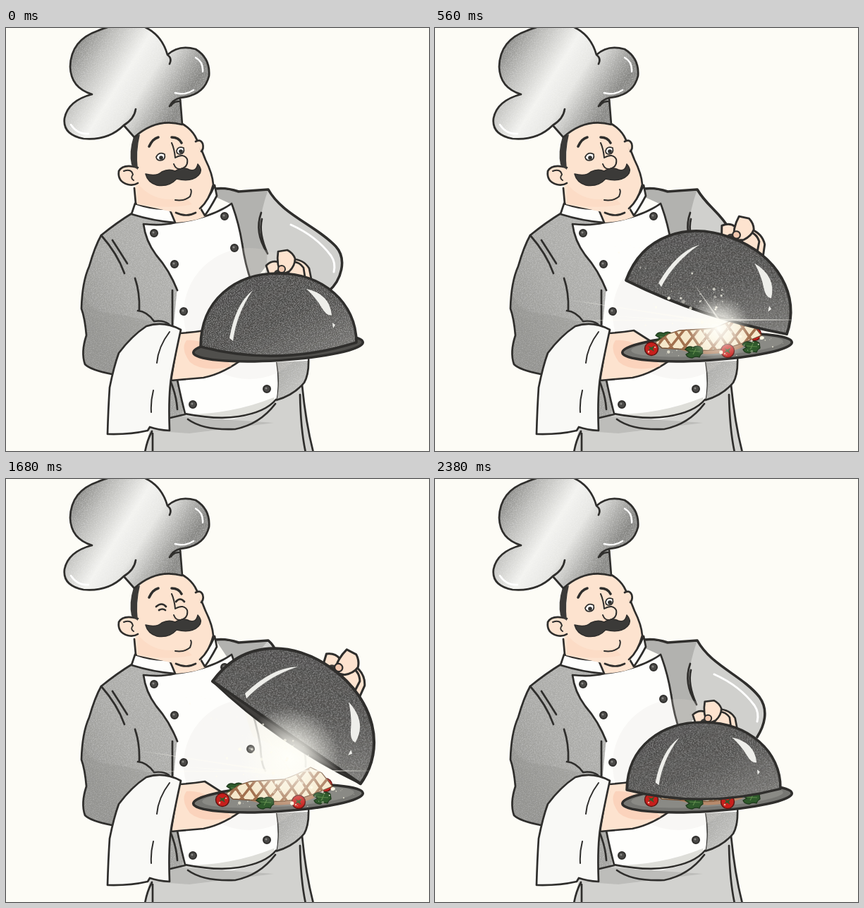
Recreate the animation shown at these times as an HTML page. Size 600 px wide and 600 px high, loop 2520 ms.

```html
<!DOCTYPE html>
<html lang="en">
<head>
<meta charset="utf-8">
<title>Chef lifting a cloche</title>
<style>
html, body { margin: 0; width: 100%; height: 100%; overflow: hidden; background: #fdfcf6; }
svg { display: block; width: 100vw; height: 100vh; }
.ink { fill: none; stroke: #2f2e2c; stroke-width: 2.7; stroke-linecap: round; stroke-linejoin: round; }
.thin { stroke-width: 2; }
.bold { stroke-width: 3.6; }
.skin { fill: #fde3cf; }
.white { fill: #fefefc; }
.towel { fill: #f9f9f6; }
.dark { fill: #3b3a38; }
</style>
</head>
<body>
<svg viewBox="0 0 600 600">
<defs>
  <linearGradient id="hat" gradientUnits="userSpaceOnUse" x1="85" y1="30" x2="275" y2="150">
    <stop offset="0" stop-color="#7f7f7c"/><stop offset=".2" stop-color="#bfbfbc"/>
    <stop offset=".4" stop-color="#f3f3f0"/><stop offset=".54" stop-color="#e6e6e3"/>
    <stop offset=".8" stop-color="#868683"/><stop offset="1" stop-color="#a5a5a2"/>
  </linearGradient>
  <linearGradient id="coat" gradientUnits="userSpaceOnUse" x1="115" y1="420" x2="235" y2="350">
    <stop offset="0" stop-color="#989895"/><stop offset=".5" stop-color="#a9a9a6"/>
    <stop offset="1" stop-color="#b0b0ad"/>
  </linearGradient>
  <linearGradient id="side" x1="0" x2="1" y1="0" y2="1">
    <stop offset="0" stop-color="#a5a5a2"/><stop offset="1" stop-color="#cbcbc8"/>
  </linearGradient>
  <linearGradient id="steel" x1="0" y1="0" x2="1" y2="1">
    <stop offset="0" stop-color="#474644"/><stop offset=".55" stop-color="#504f4d"/>
    <stop offset="1" stop-color="#7b7a77"/>
  </linearGradient>
  <radialGradient id="light">
    <stop offset="0" stop-color="#fffffa"/><stop offset=".35" stop-color="#fffef6" stop-opacity=".75"/>
    <stop offset="1" stop-color="#fffef6" stop-opacity="0"/>
  </radialGradient>
  <filter id="grain" x="0" y="0" width="1" height="1">
    <feTurbulence type="fractalNoise" baseFrequency=".7" numOctaves="2" seed="4"/>
    <feColorMatrix values="0 0 0 0 1  0 0 0 0 1  0 0 0 0 1  .6 0 0 0 -.26"/>
    <feComposite in2="SourceGraphic" operator="in" result="dots"/>
    <feMerge><feMergeNode in="SourceGraphic"/><feMergeNode in="dots"/></feMerge>
  </filter>
  <path id="fish" d="M313 446L331 434L347 429L394 426Q412 420 432 409L448 417L463 436L436 447Q404 459 378 457L322 454Z"/>
  <clipPath id="fishClip"><use href="#fish"/></clipPath>
  <g id="leaf">
    <path d="M-13-3Q-9-9-2-6Q5-10 11-5L12 2Q8 4 7 8Q1 6-3 9Q-10 9-12 4L-7 1Z" fill="#2f5a2c" stroke="#1f3a1d" stroke-width="1.3"/>
    <path d="M-7-1L8 0M-2 4L2-4" stroke="#5f8a4c" stroke-width="1.2"/>
  </g>
  <g id="tomato">
    <circle r="9.5" fill="#c81f1c" stroke="#5c1512" stroke-width="1.4"/>
    <path d="M-5-4L0-2L5-5L2 0L4 4L-1 1L-5 3L-2-1Z" fill="#335a2b"/>
    <circle cx="-4" cy="4" r="1.3" fill="#f4a795"/>
  </g>
</defs>

<!-- trousers and apron -->
<path d="M207 550L198 602H436Q428 555 420 505L380 470H230Z" fill="#d2d2cf"/>
<path d="M204 571H232V550L380 560L260 575Z" fill="#bdbdba"/>
<path class="ink" d="M207 572Q200 585 197 602M208 575V602M420 506Q425 560 436 602M417 520Q418 570 425 602"/>

<!-- torso and left sleeve -->
<path d="M180 262L240 274L260 480L250 550L232 553L233 492L150 491Q120 485 112 477Q106 460 114 436Q112 412 107 398Q108 360 118 338Q126 310 135 294Q157 276 180 262Z" fill="url(#coat)" filter="url(#grain)"/>
<path d="M108 375Q116 405 160 406L220 420L160 462L150 490L114 478Q108 460 114 436Z" fill="#868683" opacity=".25"/>
<path class="ink" d="M180 262Q157 276 135 294Q126 310 118 338Q108 360 107 398Q112 412 114 436Q106 460 112 477Q120 485 150 491"/>
<path class="ink" d="M135 294Q158 320 168 348M151 301Q162 318 172 334M183 355Q190 375 189 401M187 401Q200 402 210 416Q223 414 231 420"/>

<!-- right shoulder and sleeve -->
<path id="shoulder" fill="#b2b2af"/>
<path id="sleeve" fill="#d0d0cd"/>
<path id="sleeveEdge" class="ink bold"/>
<path id="crease" class="ink" d="M362 262Q352 290 370 318M363 271Q358 291 371 320"/>
<path id="sheen" fill="none" stroke="#fff" stroke-width="3" stroke-linecap="round" d="M404 279Q440 295 461 323Q468 333 465 346"/>

<!-- front panel -->
<path d="M385 470H429Q430 491 423 503Q408 521 383 528Z" fill="url(#side)" filter="url(#grain)"/>
<path class="ink" d="M429 468Q430 491 423 503Q408 521 383 528M383 474Q388 500 383 528"/>
<path class="white" d="M195 278Q220 281 240 276Q290 270 320 249Q330 275 334 305Q338 335 350 365L428 400V472L383 474Q388 505 383 530Q360 549 320 555Q280 556 254 547Q247 520 242 494L237 430L243 368Q224 340 213 322Q198 302 195 278Z"/>
<path d="M255 548Q320 548 380 524L382 532Q350 555 290 553Z" fill="#deded9"/>
<path class="ink" d="M243 372Q232 344 213 322Q198 302 195 278Q220 281 240 276Q290 270 320 249Q330 275 335 306M236 372V431M242 494Q247 520 254 547Q300 556 330 551Q368 545 383 527M233 553L254 548M258 555Q280 571 325 569Q360 562 382 533M233 500Q242 522 243 541"/>
<path id="flap" class="ink"/>
<circle cx="345" cy="405" r="93" fill="#deddd7" opacity=".2"/>
<g id="buttons" class="ink thin"></g>

<!-- neck and head -->
<path class="skin" d="M182 225L183 250L232 261L241 276Q270 274 283 267L296 225Z"/>
<path class="ink" style="fill:#fefefc" d="M183 249L178 264Q210 274 240 276L232 257Q205 257 183 249Z"/>
<path class="ink" style="fill:#fefefc" d="M296 223L299 238Q290 255 282 266L275 254Q288 243 296 223Z"/>
<path class="skin" d="M188 153Q215 122 255 137Q270 155 283 187Q293 207 294 222Q288 245 274 260Q261 269 242 262L186 250Q182 235 184 222Z"/>
<path d="M188 222Q213 251 254 240L264 250Q230 258 187 249ZM226 180Q238 204 252 199L244 210Z" fill="#f9cfb7" opacity=".4"/>
<path class="ink" d="M250 136Q261 142 268 153Q274 164 283 187Q293 207 294 222Q288 245 275 256M182 227L184 249M241 262Q256 269 269 262"/>
<path class="ink" style="fill:#fde3cf" d="M187 198Q166 192 160 203Q158 218 173 222Q181 224 187 220"/>
<path class="ink thin" d="M167 203Q178 199 180 208Q176 213 181 216"/>
<path class="ink" style="fill:#fde3cf" d="M269 161Q276 157 279 164Q281 171 277 175"/>
<path class="dark" d="M181 154L190 151Q184 175 187 201L178 194Q174 176 181 154Z"/>
<path class="ink bold" d="M203 168Q208 157 216 155M235 155Q245 155 249 163"/>
<g id="open" class="ink" style="stroke-width:1.7">
  <path style="fill:#fff" d="M213 183Q217 175 225 179Q227 187 219 188Q214 188 213 183ZM242 174Q244 167 252 170Q254 178 247 179Q242 179 242 174Z"/>
  <circle cx="220" cy="184" r="2" fill="#333"/><circle cx="248" cy="175" r="2" fill="#333"/>
</g>
<path id="shut" class="ink" d="M213 181Q221 174 227 181M217 186Q222 183 226 186M241 174Q247 167 253 174"/>
<path class="ink thin" style="fill:#fde3cf" d="M235 163Q239 172 240 184Q252 177 257 186Q259 197 248 200Q241 201 238 193"/>
<path class="dark" stroke="#2f2e2c" stroke-width="1.5" stroke-linejoin="round" d="M198 207Q214 211 221 204Q231 199 240 203Q251 196 260 201Q270 204 272 193Q280 202 273 209Q263 219 242 214Q231 226 214 223Q201 219 198 207Z"/>
<path class="ink thin" d="M240 244Q253 246 261 239Q264 232 262 229"/>

<!-- hat -->
<path d="M182 155L167 138Q145 160 110 157Q80 151 83 128Q88 103 122 94Q92 85 91 55Q92 17 130 4Q157-8 190-4Q220 6 229 38Q245 23 269 30Q290 43 288 68Q281 96 247 99L250 137Q213 127 182 155Z" fill="url(#hat)" filter="url(#grain)"/>
<path class="ink" d="M182 155L167 138Q145 160 110 157Q80 151 83 128Q88 103 122 94Q92 85 91 55Q92 17 130 4Q157-8 190-4Q220 6 229 38Q245 23 269 30Q290 43 288 68Q281 96 247 99L250 137Q213 127 182 155ZM122 94L116 92M184 115Q182 129 167 138M229 38Q236 43 232 51M247 99Q236 102 232 111M246 104Q238 104 234 110"/>
<path d="M269 42Q280 48 279 62M92 137Q101 151 117 150M240 92Q254 96 266 88" fill="none" stroke="#fff" stroke-width="2.5" stroke-linecap="round"/>

<!-- towel and forearm -->
<path class="ink" style="fill:#fde3cf" d="M245 433Q264 432 282 429L340 466Q310 490 280 496L234 500Z"/>
<path d="M256 443Q282 440 310 468L320 480Q279 489 261 474Q247 455 256 443Z" fill="#f9c4a9" opacity=".5"/>
<path class="towel" d="M248 428Q242 455 235 491Q230 520 232 571Q215 570 204 566L201 571Q175 577 144 576Q145 540 147 510Q153 480 160 461Q178 437 199 423Q224 415 248 428Z"/>
<path class="ink" d="M248 428Q242 455 235 491Q230 520 232 571Q215 570 204 566L201 571Q175 577 144 576Q145 540 147 510Q153 480 160 461Q178 437 199 423Q224 415 248 428Z"/>
<path class="ink thin" d="M232 431Q216 452 214 475M209 514Q205 530 206 545"/>

<!-- plate and food -->
<ellipse id="plate" cx="386" cy="453" rx="120.5" ry="18.5" transform="rotate(-3.5 386 453)" class="ink bold"/>
<g id="food">
  <ellipse cx="386" cy="451" rx="108" ry="14" transform="rotate(-3.5 386 451)" fill="#a6a6a0" opacity=".4"/>
  <use href="#leaf" x="326" y="439"/>
  <use href="#tomato" x="453" y="434"/>
  <path d="M330 452Q372 440 445 441L436 453Q405 466 365 461Z" fill="#b78a6c"/>
  <use href="#fish" fill="#f5e8cb" stroke="#6e4a2f" stroke-width="1.3"/>
  <path id="grill" clip-path="url(#fishClip)" fill="none" stroke="#a2714f" stroke-width="3.6"/>
  <use href="#leaf" x="368" y="459"/><use href="#leaf" x="449" y="452"/>
  <use href="#tomato" x="307" y="455"/><use href="#tomato" x="415" y="458"/>
</g>
<g id="plateSparks" fill="#fffbe6"></g>

<!-- cloche with the hand on its knob -->
<g id="lid">
  <g class="ink" style="fill:#fde3cf">
    <path d="M406 328Q422 328 430 341L433 356L404 356Z"/>
    <path d="M402 333Q414 329 422 340L424 353L400 356Z"/>
    <path d="M369 337Q377 329 386 332L393 348L374 352Z"/>
    <path d="M386 317L399 315Q407 319 410 327Q410 337 402 345L391 350Q383 336 386 317Z"/>
  </g>
  <path class="dark" d="M380 350Q379 343 388 342Q397 343 396 350Z"/>
  <circle class="ink thin" style="fill:#f3c9b0" cx="391" cy="342" r="5"/>
  <path id="dome" fill="url(#steel)" filter="url(#grain)"/>
  <path id="domeEdge" class="ink bold"/>
  <path id="inside" class="ink" style="fill:#413f3d"/>
  <path d="M350 372Q325 392 317 440L322 444Q327 405 350 372ZM426 370Q459 377 462 407Q455 409 448 397Q440 383 426 370ZM463 418L467 421L464 426Z" fill="#eeeeea"/>
</g>

<!-- light -->
<g id="glow">
  <circle id="halo" cx="402" fill="url(#light)"/>
  <path d="M404 420L186 385L404 417ZM404 421L235 407L404 418ZM190 415L404 412.5L525 414L404 415.5ZM404 418L365 360L406 416Z" fill="#fffef6" opacity=".6"/>
</g>
<g id="airSparks" fill="#fffdf0"></g>
</svg>
<script>
const $ = id => document.getElementById(id);
const set = (id, name, value) => $(id).setAttribute(name, value);
const show = (id, on) => $(id).style.display = on ? '' : 'none';

let seed = 7;
const rnd = () => (seed = seed * 16807 % 2147483647) / 2147483647;
const dot = (x, y, r, o) =>
  `<circle cx="${x.toFixed(1)}" cy="${y.toFixed(1)}" r="${r.toFixed(1)}" opacity="${o.toFixed(2)}"/>`;
const dots = (n, place) => Array.from({ length: n }, () =>
  dot(...place(), .5 + rnd() ** 4 * 2.2, .35 + rnd() * .6)).join('');

const buttons = [[210, 291], [310, 267], [239, 335], [252, 402], [265, 534], [370, 512], [324, 312], [347, 383]];
$('buttons').innerHTML = buttons.map(([x, y]) =>
  `<g><circle cx="${x}" cy="${y}" r="5" fill="#4b4a48"/><circle cx="${x - 1}" cy="${y - 1}" r="1.5" fill="#8a8986" stroke="none"/></g>`).join('');

let bars = '';
for (let x = 280; x < 490; x += 20) bars += `M${x} 400L${x + 44} 465M${x + 36} 400L${x - 16} 465`;
set('grill', 'd', bars);

$('plateSparks').innerHTML = dots(60, () => {
  const a = rnd() * 6.283, r = Math.sqrt(rnd());
  return [386 + 112 * r * Math.cos(a), 453 + 15 * r * Math.sin(a) - 6 * r * Math.cos(a)];
});
$('airSparks').innerHTML = dots(70, () => {
  const u = rnd();
  return [255 + u * 175, 290 + u * 90 + rnd() * (150 - u * 90)];
});

// Each pose: rim left x, y, rim right x, y, front bulge, back bulge, halo radius, light strength
const poses = [
  [276, 452, 497, 446, 16, 16, 0, 0],
  [272, 441, 490, 439, 15, 15, 0, 0],
  [267, 420, 484, 442, 11, 11, 0, 0],
  [267, 389, 487, 436, 10, 10, 0, 0],
  [271, 358, 499, 434, 8, 8, 46, 1],
  [280, 322, 501, 433, 5, 5, 62, 1],
  [293, 287, 503, 432, 9, 0, 72, 1],
  [305, 257, 507, 431, 11, -17, 42, .6]
];
const sleeves = [
  'C392 265 440 280 468 310C484 328 476 358 457 374',
  'C392 265 435 278 460 309C474 328 467 350 457 366',
  'C392 265 435 278 460 309C474 328 467 350 457 366',
  'C388 262 430 278 453 309C470 328 467 343 465 356',
  'C385 252 405 262 418 286L400 330',
  'C382 242 390 252 398 268L390 310',
  'Q380 236 383 245L370 265',
  'L365 240'
];

// Carries the resting rim onto the given rim; flat squeezes the height of the dome
function lidMatrix(x1, y1, x2, y2, flat) {
  const dx = 221, dy = -6, d = dx * dx + dy * dy, ex = x2 - x1, ey = y2 - y1;
  const a = (ex * dx + ey * dy) / d, b = (ey * dx - ex * dy) / d, c = -b * flat, e = a * flat;
  return `matrix(${a} ${b} ${c} ${e} ${x1 - a * 276 - c * 452} ${y1 - b * 276 - e * 452})`;
}

function draw(p) {
  const [x1, y1, x2, y2, front, back, halo, power] = poses[p];
  const happy = p > 5;
  const arc = 'M276 452C276 386 325 348 386 348C450 348 497 390 497 446';
  const rim = b => `Q386 ${449 + 2 * b} `;
  const dome = `${arc}${rim(back)}276 452Z`;
  set('lid', 'transform', lidMatrix(x1, y1, x2, y2, p ? .955 : 1));
  set('dome', 'd', dome);
  set('domeEdge', 'd', dome);
  set('inside', 'd', `M276 452${rim(back)}497 446${rim(front)}276 452Z`);
  show('inside', happy);

  const top = 'M297 228Q312 226 330 232L372 229';
  set('shoulder', 'd', happy ? 'M297 228L330 232L372 229L381 244L320 262Z'
    : 'M297 228L330 232L372 229L375 330L350 362Q334 320 320 250L298 240Z');
  set('sleeve', 'd', 'M372 229' + sleeves[p] + (happy ? 'L350 255Z' : 'L362 365Q372 340 370 318Q350 290 372 229Z'));
  set('sleeveEdge', 'd', top + sleeves[p]);
  show('crease', p < 5);
  show('sheen', p < 3);
  set('sheen', 'transform', p ? 'translate(-8 -2)' : '');
  set('flap', 'd', happy ? 'M340 305Q356 345 361 380Q362 405 368 414M421 378Q426 395 425 408' : 'M335 306Q339 335 348 360');
  set('flap', 'opacity', happy ? .3 : 1);
  const list = $('buttons').children;
  list[6].style.display = happy ? 'none' : '';
  list[7].style.display = happy ? '' : 'none';

  show('open', !happy);
  show('shut', happy);
  show('food', p);
  show('plateSparks', p > 1);
  set('plate', 'style', `fill:${p ? '#777773' : '#504f4c'}`);
  show('glow', power);
  set('glow', 'opacity', power);
  set('halo', 'r', halo);
  set('halo', 'cy', happy ? 396 : 426);
  show('airSparks', p > 3);
}

let last = -1;
function tick(now) {
  const step = Math.floor(now % 2520 / 140);
  const p = step < 7 ? step : step < 12 ? 7 : 18 - step;
  if (p !== last) draw(last = p);
  requestAnimationFrame(tick);
}
tick(performance.now());
</script>
</body>
</html>
```
